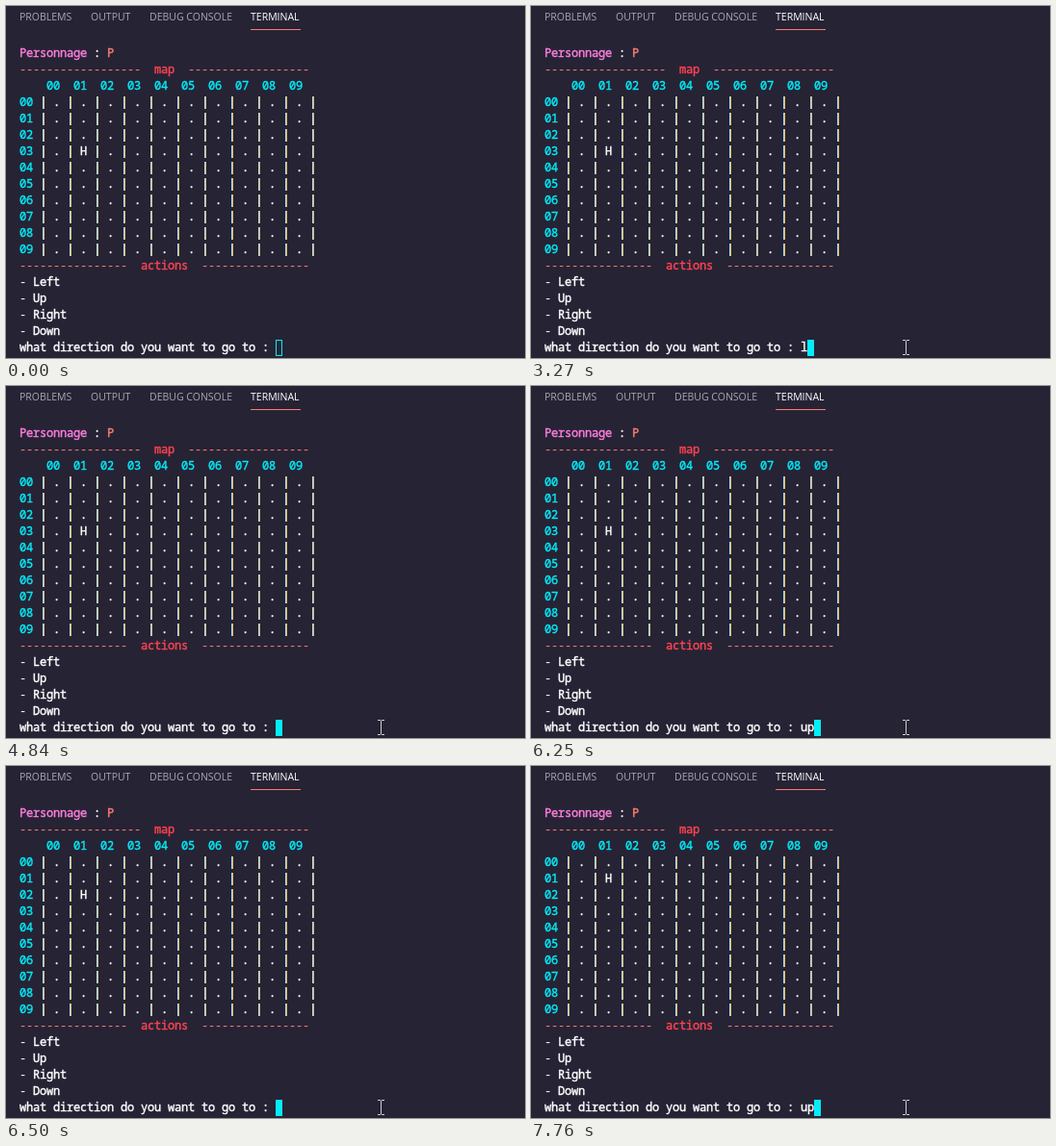
An HTML page with a canvas that plays this animation: 539x366 px, repeating every 8000 ms.

```html
<!DOCTYPE html>
<html lang="en">
<head>
<meta charset="utf-8">
<title>Terminal map game</title>
<style>
  html, body { margin: 0; width: 100%; height: 100%; overflow: hidden; background: #262335; }
  canvas { display: block; }
</style>
</head>
<body>
<canvas width="539" height="366"></canvas>
<script>
const ctx = document.querySelector('canvas').getContext('2d', { alpha: false });

const LOOP = 8000, LEFT = 14, TOP = 41, CELL_W = 7, CELL_H = 17, BASELINE = 12;
const BACK = '#262335', WHITE = '#ffffff', CYAN = '#03edf9', PINK = '#ff7edb',
      RED = '#fe4450', CORAL = '#f97e72', GREY = '#a9a7b0',
      PIPE_LEFT = '#a3dcff', PIPE_RIGHT = '#e0b762';

const TABS = [['PROBLEMS', 14], ['OUTPUT', 88], ['DEBUG CONSOLE', 149], ['TERMINAL', 254]];
const PROMPT = 'what direction do you want to go to : ';
const SCROLLED = 8; // lines already printed while a new board is being written

// [start ms, typed text, hero column, hero row, print column while scrolling]
const STATES = [
  [0, '', 1, 3],
  [3270, 'l', 1, 3], [3340, 'le', 1, 3], [3420, 'lef', 1, 3], [3660, 'left', 1, 3],
  [3730, '', 0, 3],
  [4290, 'r', 0, 3], [4370, 'ri', 0, 3], [4520, 'rig', 0, 3], [4595, 'righ', 0, 3], [4670, 'right', 0, 3],
  [4840, '', 1, 3],
  [6100, 'u', 1, 3], [6250, 'up', 1, 3],
  [6420, 'up', 1, 3, 43],
  [6500, '', 1, 2],
  [6900, 'u', 1, 2], [7070, 'up', 1, 2],
  [7220, 'up', 1, 2, 23],
  [7300, '', 1, 1],
  [7530, 'u', 1, 1], [7760, 'up', 1, 1]
];

// [start ms, x, y] of the mouse pointer
const POINTER = [[70, 409, 360], [150, 400, 357], [230, 391, 356], [400, 397, 350], [470, 391, 355], [650, 390, 355]];
const FOCUS_TIME = 470;

const at = (list, time) => list.filter(entry => entry[0] <= time).pop();
const twoDigits = n => String(n).padStart(2, '0');
const ten = Array.from({ length: 10 }, (_, i) => i);

function heading(title, dashes) {
  const rule = '-'.repeat(dashes);
  return [[rule, CORAL], [`  ${title}  `, RED], [rule, CORAL]];
}

// Each line is a list of [text, colour] runs.
function board(heroX, heroY, typed) {
  const mapRow = y => [
    [twoDigits(y), CYAN],
    [' |' + ten.map(x => x === heroX && y === heroY ? ' H |' : ' . |').join(''), WHITE]
  ];
  return [
    [['Personnage', PINK], [' : ', WHITE], ['P', CORAL]],
    heading('map', 18),
    [['    ' + ten.map(twoDigits).join('  '), CYAN]],
    ...ten.map(mapRow),
    heading('actions', 16),
    ...['Left', 'Up', 'Right', 'Down'].map(name => [['- ' + name, WHITE]]),
    [[PROMPT + typed, WHITE]]
  ];
}

function rect(x, y, width, height, colour) {
  ctx.fillStyle = colour;
  ctx.fillRect(x, y, width, height);
}

function drawTabs() {
  ctx.font = '10.5px "Open Sans", "Noto Sans", sans-serif';
  ctx.textAlign = 'left';
  for (const [label, x] of TABS) {
    ctx.fillStyle = label === 'TERMINAL' ? WHITE : GREY;
    ctx.fillText(label, x, 15);
  }
  rect(254, 24, 52, 1, CORAL);
}

function drawChar(char, x, y, colour) {
  if (char === '|') {
    // The stem lies across two pixels and has a colour fringe.
    rect(x + 3, y + 2, 1, 13, PIPE_LEFT);
    rect(x + 4, y + 2, 1, 13, PIPE_RIGHT);
    return;
  }
  ctx.fillStyle = ctx.strokeStyle = colour;
  ctx.fillText(char, x + CELL_W / 2, y + BASELINE);
  // A thin outline gives letters the heavier terminal weight.
  if (char !== '-') ctx.strokeText(char, x + CELL_W / 2, y + BASELINE);
}

function drawLine(runs, row, endColumn) {
  let column = 0;
  for (const [text, colour] of runs) {
    for (const char of text) {
      if (char !== ' ' && column < endColumn) {
        drawChar(char, LEFT + column * CELL_W, TOP + row * CELL_H, colour);
      }
      column++;
    }
  }
}

function drawCursor(column, row, focused) {
  const x = LEFT + column * CELL_W, y = TOP + row * CELL_H;
  rect(x, y, CELL_W, CELL_H, CYAN);
  if (!focused) rect(x + 1, y + 1, CELL_W - 2, CELL_H - 2, BACK);
}

function drawPointer(x, y) {
  const colour = '#d0d0d4';
  rect(x - 1, y - 7, 1, 14, colour);
  for (const end of [y - 8, y + 7]) {
    rect(x - 4, end, 3, 1, colour);
    rect(x, end, 3, 1, colour);
  }
}

function draw(time) {
  const [, typed, heroX, heroY, printColumn] = at(STATES, time);
  let lines = board(heroX, heroY, typed);
  if (printColumn) {
    const next = board(heroX, heroY - 1, '');
    lines = [...lines.slice(SCROLLED), ...next.slice(0, SCROLLED)];
  }
  const lastRow = lines.length - 1;
  const cursorColumn = printColumn || PROMPT.length + typed.length;

  rect(0, 0, 539, 366, BACK);
  drawTabs();
  ctx.font = '500 12px "Noto Sans Mono", "DejaVu Sans Mono", monospace';
  ctx.textAlign = 'center';
  ctx.lineWidth = 0.4;
  lines.forEach((runs, row) => drawLine(runs, row, row === lastRow ? cursorColumn : Infinity));
  drawCursor(cursorColumn, lastRow, time >= FOCUS_TIME);

  const pointer = at(POINTER, time);
  if (pointer) drawPointer(pointer[1], pointer[2]);
}

const start = performance.now();
function tick() {
  draw((performance.now() - start) % LOOP);
  requestAnimationFrame(tick);
}
tick();
</script>
</body>
</html>
```
